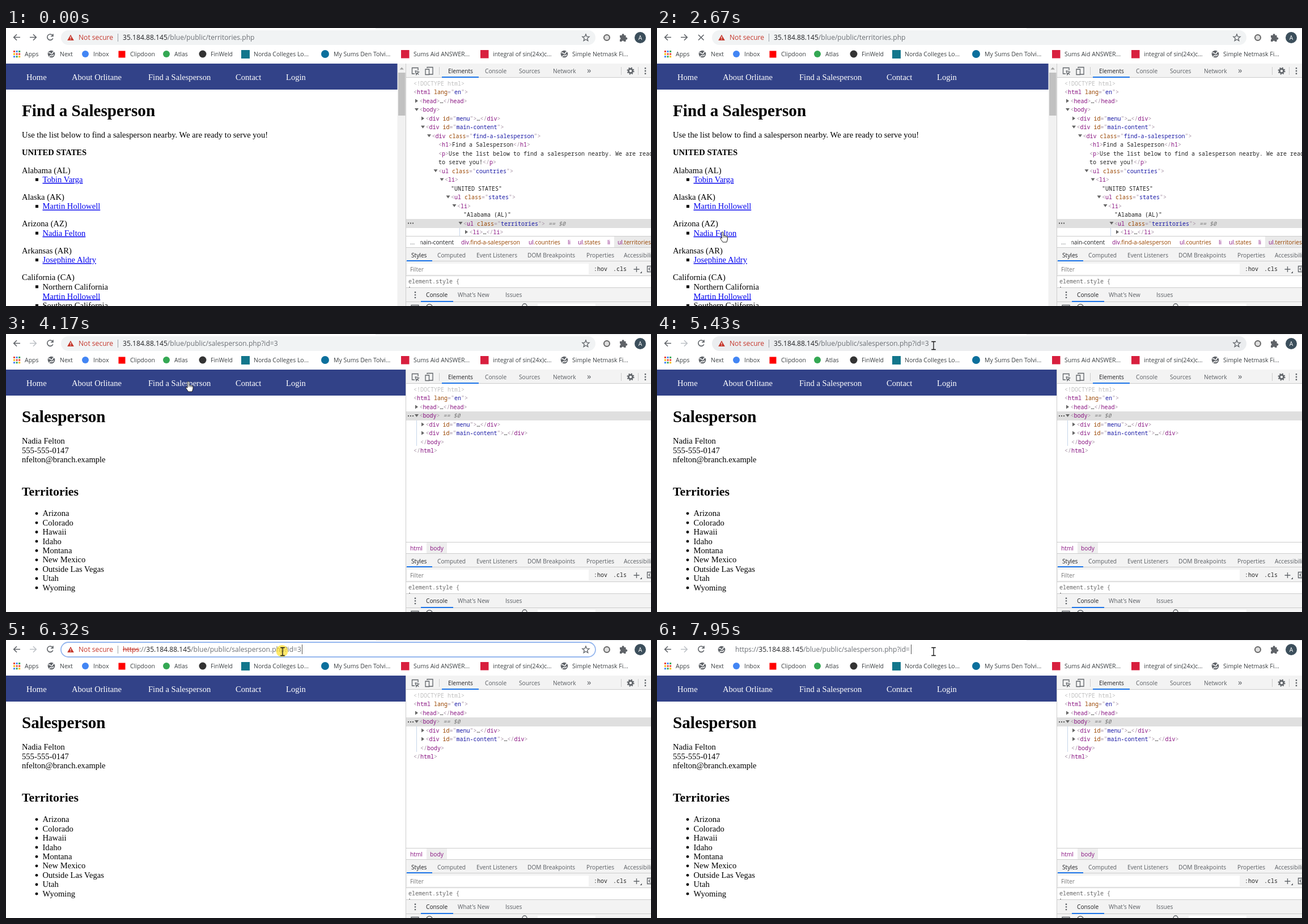
These frames come from a looping animation (1138x492 px, 8 s). An HTML page:

```html
<!DOCTYPE html>
<html lang="en">
<head>
<meta charset="utf-8">
<title>Browsing the sales directory</title>
<style>
  html, body { margin: 0; width: 100%; height: 100%; overflow: hidden; background: #fff; }
  svg { display: block; width: 1138px; height: 492px; }
  text { white-space: pre; }
  .page { font: 14.6px "Liberation Serif", serif; }
  .page .h1 { font-size: 29.2px; font-weight: bold; }
  .page .h2 { font-size: 21.9px; font-weight: bold; }
  .link { fill: #00e; text-decoration: underline; }
  .ui { font: 10.2px "Open Sans", sans-serif; fill: #5a5e63; }
  .marks { font: 10.5px "Open Sans", sans-serif; fill: #3c4043; }
  .url { font: 12.1px "Open Sans", sans-serif; fill: #6b6f74; }
  .mono { font: 10px "Noto Sans Mono", monospace; fill: #222; }
  .strong { fill: #202124; }
  .red { fill: #c5372c; }
  .tag { fill: #881280; }
  .attr { fill: #994500; }
  .value { fill: #1a1aa6; }
  .punct { fill: #a894a6; }
  .note { fill: #777; font-style: italic; }
  .icon { fill: none; stroke: #5f6368; stroke-width: 1.6; }
  .thin { stroke-width: 1.3; }
  .rule { fill: none; stroke: #ccc; }
  .bar { fill: #f3f3f3; }
  .accent { fill: #1a73e8; }
</style>
</head>
<body>
<svg viewBox="0 0 1138 492">
  <defs>
    <clipPath id="crumbClip"><path d="M731 369h407v20H731z"/></clipPath>
    <g id="globe">
      <circle r="6.3" fill="#5f6368"/>
      <path d="M-5-2q3-1 4 1t3 0q0-3 3-3M-3 5q0-3 3-2t4-2" fill="none" stroke="#fff" stroke-width="1.5"/>
    </g>
    <path id="open" d="M-3.5-2.5h7l-3.5 5z" fill="#666"/>
    <path id="shut" d="M-2.5-3.5v7l5-3.5z" fill="#666"/>
    <path id="arrow" d="M.5.5V14.8L3.7 11.8 5.9 16.7 8 15.8 5.9 11H10.3Z" fill="#fff" stroke="#222" stroke-width=".9"/>
    <g id="hand">
      <path d="M-1.4 11V1.4a1.4 1.4 0 0 1 2.8 0V6.5q1.4-1 2.5.6 1.5-.8 2.4.7 2.2-.4 2.2 1.6V13L6.9 18H.2L-3.6 12.6q-1.6-2 0-2.6z" fill="#fff" stroke="#222"/>
      <path d="M1.4 6.5v3.5M3.9 7.1v3M6.3 7.8v2.6" stroke="#222" stroke-width=".8"/>
    </g>
    <path id="beam" d="M-3.8-6.5H3.8M0-6.5V7.5M-3.8 7.5H3.8" fill="none" stroke="#111" stroke-width="1.3"/>
  </defs>
  <rect width="1138" height="492" fill="#fff"/>

  <!-- Toolbar -->
  <path d="M652 .5h486" stroke="#e3e5e8"/>
  <g class="icon">
    <path d="M25 16.5H14M19 11.2l-5.3 5.3 5.3 5.3"/>
    <path id="forward" d="M42 16.5h11M48 11.2l5.3 5.3-5.3 5.3"/>
    <path data-on="0-2670 3190-8000" d="M82.3 13.2a5.2 5.2 0 1 0 .5 5M83 10.5v4h-4"/>
    <path data-on="2670-3190" d="M73 12l9.5 9.5M82.5 12L73 21.5"/>
  </g>
  <rect id="omnibox" x="97" y="4" width="943" height="26" rx="13" stroke-width="1.8"/>
  <g data-on="0-7950">
    <path d="M114 11.7l5.8 10.3h-11.6z" fill="#c5372c"/>
    <path d="M114 15v3.6M114 19.6v1.2" stroke="#fff" stroke-width="1.2"/>
    <text class="url red" x="128" y="21.3">Not secure</text>
    <path d="M197.5 10v14" stroke="#9aa0a6"/>
    <path class="icon thin" d="M1023 11l1.7 4.1 4.4.3-3.4 2.8 1.1 4.3-3.8-2.3-3.8 2.3 1.1-4.3-3.4-2.8 4.4-.3z"/>
  </g>
  <rect data-on="5930-6320" x="206" y="7.5" width="275" height="18" fill="#0078d7"/>
  <g class="url">
    <text data-on="0-3190" x="206" y="21.3"><tspan class="strong">35.184.88.145</tspan>/blue/public/territories.php</text>
    <text data-on="3190-5930" x="206" y="21.3"><tspan class="strong">35.184.88.145</tspan>/blue/public/salesperson.php?id=3</text>
    <text data-on="5930-6320" x="206" y="21.3" fill="#fff">35.184.88.145/blue/public/salesperson.php?id=3</text>
    <text data-on="6320-7950" x="206" y="21.3"><tspan class="red" text-decoration="line-through">https</tspan>://<tspan class="strong">35.184.88.145</tspan>/blue/public/salesperson.php?id=3</text>
    <text data-on="7950-8000" x="138" y="21.3">https://<tspan class="strong">35.184.88.145</tspan>/blue/public/salesperson.php?id=</text>
  </g>
  <path data-on="6320-6920 7420-7950" d="M522.5 8v17" stroke="#555"/>
  <path data-on="7950-8000" d="M448.5 8v17" stroke="#555"/>
  <use data-on="7950-8000" href="#globe" x="114" y="17"/>
  <circle cx="1060" cy="17" r="5" fill="#ddd" stroke="#666" stroke-width="2"/>
  <path d="M1083 13h3.6a2.1 2.1 0 1 1 4 0h3v3.6a2.1 2.1 0 1 1 0 4V24h-3.4a2 2 0 0 0-3.8 0H1083v-3.6a2 2 0 0 0 0-3.8z" fill="#5f6368"/>
  <circle cx="1119" cy="17" r="10" fill="#3c4f5c"/>
  <text class="ui" x="1119" y="20.7" text-anchor="middle" style="fill:#fff">A</text>

  <!-- Bookmarks -->
  <g id="appGrid"></g>
  <use href="#globe" x="80" y="46"/>
  <circle cx="140" cy="46" r="6" fill="#4285f4"/>
  <path d="M198.5 40.5h12v12h-12z" fill="#f00"/>
  <circle cx="283" cy="46" r="6" fill="#34a853"/>
  <circle cx="347" cy="46" r="6.5" fill="#333"/>
  <path d="M415 39h15v15h-15z" fill="#12768c"/>
  <circle cx="563" cy="46" r="7" fill="#0b6f9c"/>
  <path d="M697 39h14.5v14.5H697zM837 39h14.5v14.5H837z" fill="#d81f3e"/>
  <use href="#globe" x="985" y="46"/>
  <g class="marks">
    <text x="33" y="50">Apps</text><text x="95" y="50">Next</text>
    <text x="154" y="50">Inbox</text><text x="219" y="50">Clipdoon</text>
    <text x="297" y="50">Atlas</text><text x="361" y="50">FinWeld</text>
    <text x="437" y="50">Norda Colleges Lo...</text>
    <text x="578" y="50">My Sums Den Tolvi...</text>
    <text x="719" y="50">Sums Aid ANSWER...</text>
    <text x="859" y="50">integral of sin(24x)c...</text>
    <text x="999" y="50">Simple Netmask Fi...</text>
  </g>

  <!-- Web page -->
  <g class="page">
    <path d="M0 63h705v46H0z" fill="#324288"/>
    <g fill="#fff">
      <text x="36" y="92">Home</text><text x="116" y="92">About Orlitane</text>
      <text x="251" y="92">Find a Salesperson</text><text x="405" y="92">Contact</text>
      <text x="494" y="92">Login</text>
    </g>
    <g data-on="0-3190" id="directory">
      <path d="M690.5 63h15v429h-15z" fill="#f1f1f1"/>
      <path d="M692 79h12.5v76H692z" fill="#c1c1c1"/>
      <path d="M694.5 73.5l3.7-4 3.7 4z" fill="#a0a0a0"/>
      <text class="h1" x="28" y="156">Find a Salesperson</text>
      <text x="28" y="194.3">Use the list below to find a salesperson nearby. We are ready to serve you!</text>
      <text x="28" y="225.3" font-weight="bold">UNITED STATES</text>
    </g>
    <g data-on="3190-8000" id="profile">
      <text class="h1" x="28" y="156">Salesperson</text>
      <text x="28" y="194.3">Nadia Felton</text>
      <text x="28" y="210.8">555-555-0147</text>
      <text x="28" y="227.2">nfelton@branch.example</text>
      <text class="h2" x="28" y="286">Territories</text>
    </g>
  </g>

  <!-- Developer tools -->
  <path class="bar" d="M706 63h432v25H706zM706 389h432v50H706zM706 460h432v32H706z"/>
  <g id="treeBefore" data-on="0-3190">
    <path d="M706 338h432v16H706z" fill="#dfdfdf"/>
    <path d="M800.5 354v14" stroke="#c5d5ea"/>
    <path d="M709 345.5h2m2 0h2m2 0h2" stroke="#555" stroke-width="2"/>
  </g>
  <g id="treeAfter" data-on="3300-8000">
    <path d="M706 137h432v16H706z" fill="#dfdfdf"/>
    <path d="M724.5 153v45" stroke="#c5d5ea"/>
    <path d="M709 145h2m2 0h2m2 0h2" stroke="#555" stroke-width="2"/>
  </g>
  <g class="ui" data-on="0-3190">
    <path d="M1073 369h65v20h-65z" fill="#eaeaea"/>
    <text x="713" y="383">...</text>
    <g clip-path="url(#crumbClip)"><text x="790" y="383" text-anchor="end" class="strong">main-content</text></g>
    <text x="803" y="383" class="attr"><tspan class="tag">div</tspan>.find-a-salesperson</text>
    <text x="922" y="383" class="attr"><tspan class="tag">ul</tspan>.countries</text>
    <text x="991" y="383" class="tag">li</text>
    <text x="1009" y="383" class="attr"><tspan class="tag">ul</tspan>.states</text>
    <text x="1061" y="383" class="tag">li</text>
    <text x="1079" y="383" class="attr"><tspan class="tag">ul</tspan>.territories</text>
  </g>
  <g class="ui" data-on="3300-8000">
    <path d="M742 369h36v20h-36z" fill="#eee"/>
    <text x="713" y="383" class="tag">html</text><text x="748" y="383" class="tag">body</text>
  </g>
  <path class="rule" d="M705.5 63v429M706 87.5h432M706 368.5h432M706 388.5h432M706 412.5h432M706 438.5h432M706 459.5h432M706 484.5h432M764.5 69v14M1085.5 69v14M1115.5 69v14"/>
  <path class="accent" d="M769 86h65v2h-65zM707 411h45v2h-45zM732 483h57v2h-57z"/>
  <g class="icon thin">
    <path d="M721 81h-4.5V70.5H727V75M722 75.5l2 7 1.5-2.6 2.6 2.6M722 75.5l6.5 2.5-3 1.9"/>
    <path d="M743 71v-1.5h10V82h-6M740 73h6.5v9.5H740z"/>
    <circle cx="1102" cy="76" r="3.6" stroke-width="2.6"/>
    <circle cx="1102" cy="76" r="5.6" stroke-dasharray="2.2 2.2" stroke-width="1.8"/>
    <path id="plus" d="M1112.5 422v10M1107.5 427h10"/>
    <path d="M1138 421.5h-6.5v10h6.5M1137 424l-3 2.5 3 2.5"/>
    <path d="M715 492v-1.5h13V492M742 492a5.5 5.5 0 0 1 10 0M911 492a4 4 0 0 1 8 0"/>
  </g>
  <path d="M1122 430.5v3.5h-3.5zM1126.8 70h2.4v2.4h-2.4zm0 4.8h2.4v2.4h-2.4zm0 4.8h2.4V82h-2.4zM720.8 466.5h2.4v2.4h-2.4zm0 4.7h2.4v2.4h-2.4zm0 4.7h2.4v2.4h-2.4z" fill="#5f6368"/>
  <path d="M708 417h320v19H708zM938 488h102v4H938z" fill="#fff"/>
  <g class="ui">
    <text x="780" y="80" class="strong">Elements</text><text x="845" y="80">Console</text>
    <text x="905" y="80">Sources</text><text x="965" y="80">Network</text>
    <text x="1025" y="80" style="font-size:15px">»</text>
    <text x="715" y="405.5" class="strong">Styles</text><text x="761" y="405.5">Computed</text>
    <text x="830" y="405.5">Event Listeners</text><text x="920" y="405.5">DOM Breakpoints</text>
    <text x="1024" y="405.5">Properties</text><text x="1090" y="405.5">Accessibility</text>
    <text x="713" y="430.5" fill="#777">Filter</text>
    <text x="741" y="476" class="strong">Console</text><text x="797" y="476">What's New</text>
    <text x="881" y="476">Issues</text>
    <text data-on="3190-3420" x="930" y="456" class="note" text-anchor="middle">No matching selector or style</text>
  </g>
  <g class="mono">
    <text x="1037" y="430">:hov</text><text x="1071" y="430">.cls</text>
    <g data-on="0-3190 3420-8000">
      <text x="710" y="451.5" fill="#666">element.style {</text>
      <path d="M711 458.5h2" stroke="#666"/>
    </g>
  </g>

  <circle id="press" data-on="2410-2670 5680-5930 6320-6570" r="10.5" fill="#ffdd1a" opacity=".65"/>
  <use id="pointer"/>
</svg>
<script>
const LOOP = 8000;
const byId = id => document.getElementById(id);

function add(parent, name, attrs, text = '') {
  const node = document.createElementNS('http://www.w3.org/2000/svg', name);
  for (const key in attrs) node.setAttribute(key, attrs[key]);
  node.textContent = text;
  return parent.appendChild(node);
}

const gridColors = ['#ea4335', '#fbbc04', '#34a853', '#4285f4'];
for (let i = 0; i < 9; i++) {
  add(byId('appGrid'), 'rect', {
    x: 13 + i % 3 * 4.6, y: 40 + Math.floor(i / 3) * 4.6,
    width: 3, height: 3, fill: gridColors[(i * 3 + (i > 4)) % 4]
  });
}

const states = [
  ['Alabama (AL)', 'Tobin Varga'], ['Alaska (AK)', 'Martin Hollowell'],
  ['Arizona (AZ)', 'Nadia Felton'], ['Arkansas (AR)', 'Josephine Aldry'],
  ['California (CA)']
];
const directory = byId('directory');
const square = y => add(directory, 'rect', { x: 52, y: y - 7.2, width: 5, height: 5 });
states.forEach(([state, seller], i) => {
  const y = 256.5 + 47.4 * i;
  add(directory, 'text', { x: 28, y }, state);
  square(y + 16.5);
  if (seller) add(directory, 'text', { x: 64.5, y: y + 16.5, class: 'link' }, seller);
});
add(directory, 'text', { x: 64.5, y: 463 }, 'Northern California');
add(directory, 'text', { x: 64.5, y: 479.5, class: 'link' }, 'Martin Hollowell');
add(directory, 'text', { x: 64.5, y: 496 }, 'Southern California');
square(496);

['Arizona', 'Colorado', 'Hawaii', 'Idaho', 'Montana', 'New Mexico',
  'Outside Las Vegas', 'Utah', 'Wyoming'].forEach((name, i) => {
  const y = 322.2 + 16.45 * i;
  add(byId('profile'), 'circle', { cx: 54, cy: y - 4.6, r: 2.4 });
  add(byId('profile'), 'text', { x: 64.5, y }, name);
});

// Splits markup into coloured pieces
const token = /(?<punct><\/?|>|="|"(?=[\s>]))|(?<=<\/?)(?<tag>\w+)|(?<attr>\w+)(?==")|(?<==")(?<value>[^"]+)/g;
function codeLine(parent, x, y, code) {
  const line = add(parent, 'text', { x, y, class: 'mono' });
  let end = 0;
  for (const match of code.matchAll(token)) {
    if (match.index > end) add(line, 'tspan', {}, code.slice(end, match.index));
    const kind = Object.keys(match.groups).find(key => match.groups[key]);
    add(line, 'tspan', { class: kind }, match[0]);
    end = match.index + match[0].length;
  }
  add(line, 'tspan', {}, code.slice(end));
  return line;
}

// Each row: left edge, markup, optional disclosure triangle
function drawTree(parent, rows, selected) {
  rows.forEach(([x, code, marker], i) => {
    const y = 102 + 15.47 * i;
    if (marker) add(parent, 'use', { href: '#' + marker, x: x - 5, y: y - 4 });
    const line = codeLine(parent, x, y, code);
    if (i === selected) add(line, 'tspan', { class: 'note' }, ' == $0');
  });
  const doctype = parent.querySelector('text');
  doctype.textContent = rows[0][1];
  doctype.style.fill = '#c0c0c0';
}
const head = [
  [719, '<!DOCTYPE html>'], [719, '<html lang="en">'],
  [729.5, '<head>…</head>', 'shut'], [729.5, '<body>', 'open'],
  [740.5, '<div id="menu">…</div>', 'shut']
];
drawTree(byId('treeBefore'), [...head,
  [740.5, '<div id="main-content">', 'open'],
  [751.5, '<div class="find-a-salesperson">', 'open'],
  [763, '<h1>Find a Salesperson</h1>'],
  [763, '<p>Use the list below to find a salesperson nearby. We are ready'],
  [763, 'to serve you!</p>'],
  [763, '<ul class="countries">', 'open'], [774, '<li>', 'open'],
  [785, '"UNITED STATES"'],
  [785, '<ul class="states">', 'open'], [796, '<li>', 'open'],
  [807, '"Alabama (AL)"'],
  [807, '<ul class="territories">', 'open'], [817.5, '<li>…</li>', 'shut']
], 16);
drawTree(byId('treeAfter'), [...head,
  [740.5, '<div id="main-content">…</div>', 'shut'],
  [731, '</body>'], [719, '</html>']
], 3);

const pointerSteps = [
  [590, 'arrow', 719, 379], [700, 'arrow', 716, 379], [930, 'arrow', 444, 285],
  [1080, 'arrow', 409, 256], [1310, 'arrow', 310, 255], [1440, 'arrow', 237.5, 255],
  [1560, 'arrow', 205, 272], [1680, 'arrow', 176, 298], [1800, 'arrow', 150, 325],
  [1930, 'arrow', 130, 346], [2050, 'hand', 115.5, 360], [2170, 'hand', 116, 361],
  [3670, 'arrow', 150, 300], [3800, 'arrow', 196, 225], [3920, 'arrow', 234, 164],
  [4170, 'hand', 321.5, 84], [4320, 'arrow', 368, 64], [4430, 'arrow', 412, 46],
  [4550, 'arrow', 450, 36], [4670, 'beam', 472, 23], [4790, 'beam', 484, 20],
  [4930, 'arrow', 490, 33], [5060, 'beam', 487, 20], [5430, 'beam', 488, 20]
];
const timed = [...document.querySelectorAll('[data-on]')].map(node => ({
  node, spans: node.dataset.on.split(' ').map(span => span.split('-').map(Number))
}));
const within = (t, from, to) => t >= from && t < to;

function omniboxColors(t, pointer) {
  if (t >= 7950) return ['#fff', 'none'];
  if (t >= 5680) return ['#fff', '#94b6ee'];
  return [pointer && pointer[1] === 'beam' ? '#ebedef' : '#f1f3f4', 'none'];
}

function render(t) {
  for (const { node, spans } of timed) {
    node.style.display = spans.some(([from, to]) => within(t, from, to)) ? '' : 'none';
  }
  const step = pointerSteps.findLast(([start]) => start <= t);
  const pointer = byId('pointer');
  pointer.style.display = step ? '' : 'none';
  if (step) {
    const [, kind, x, y] = step;
    pointer.setAttribute('href', '#' + kind);
    pointer.setAttribute('transform', `translate(${x} ${y})`);
    byId('press').setAttribute('transform', `translate(${x - 1} ${y - .5})`);
  }
  const [fill, stroke] = omniboxColors(t, step);
  byId('omnibox').setAttribute('fill', fill);
  byId('omnibox').setAttribute('stroke', stroke);
  byId('forward').style.stroke = t < 3190 ? '#5f6368' : '#bdc1c6';
  byId('plus').style.stroke = within(t, 3190, 3420) ? '#aaa' : '#5f6368';
}

function tick() {
  render(performance.now() % LOOP);
  requestAnimationFrame(tick);
}
tick();
</script>
</body>
</html>
```
